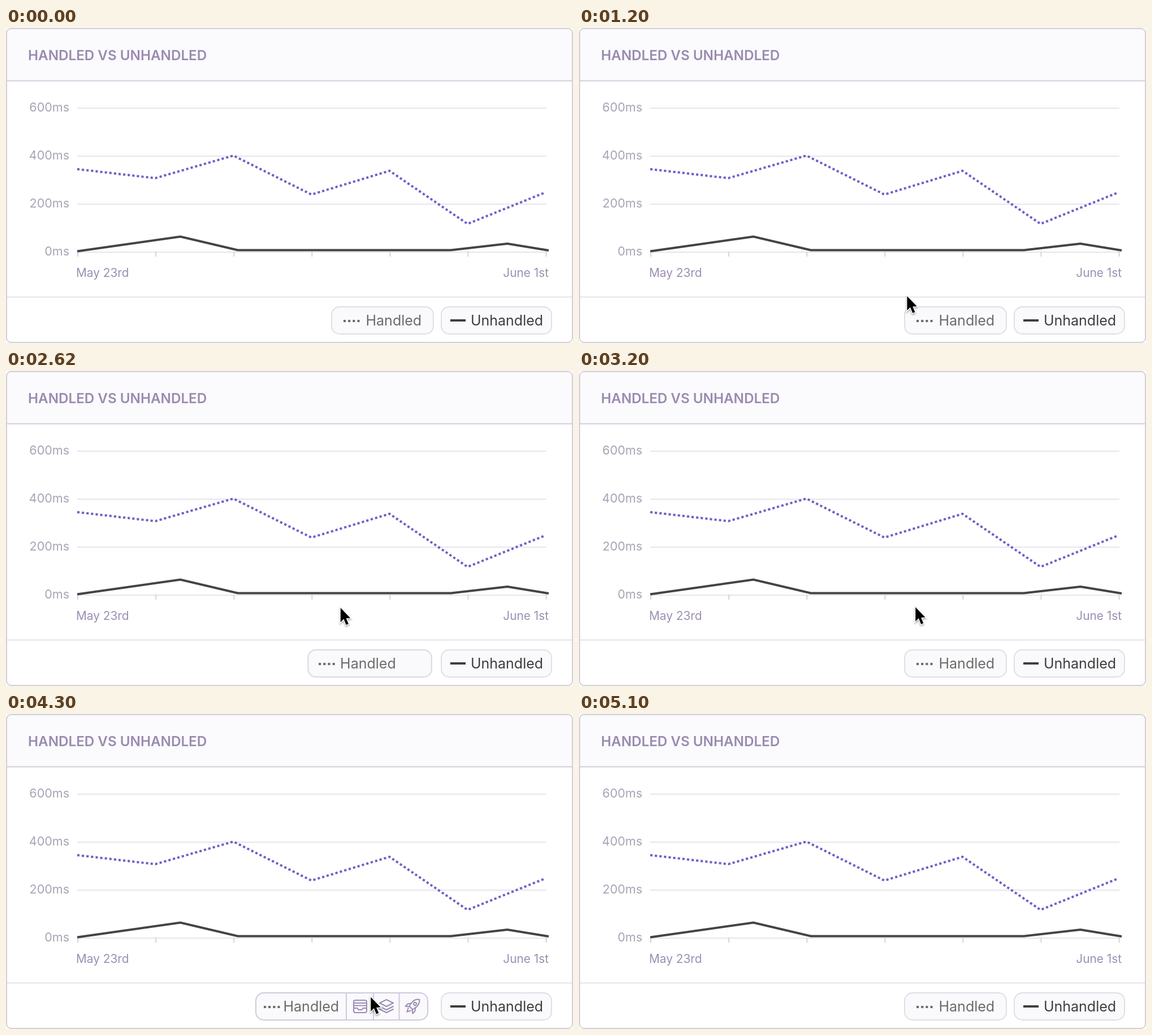
Animation of 1003x558 px, one loop 5980 ms. Source, as an HTML page:

```html
<!DOCTYPE html>
<html lang="en">
<head>
<meta charset="utf-8">
<title>Handled vs unhandled</title>
<style>
  html, body { margin: 0; width: 100%; height: 100%; overflow: hidden; background: #fff; }
  svg { display: block; width: 1003px; height: 558px; font-family: Inter, Roboto, sans-serif; }
  .title { font-size: 24.2px; font-weight: 600; fill: #9a8bb0; }
  .scale { font-size: 21.5px; fill: #aaa3b5; stroke: none; text-anchor: end; }
  .date { font-size: 20.8px; fill: #9c8fb2; }
  .legend { font-size: 25px; }
  .line { fill: none; stroke-width: 4; }
  .dots { stroke-dasharray: 4.08; }
  .chip { fill: #faf9fb; stroke: #e1dee7; stroke-width: 2; }
  .icons { fill: none; stroke: #9c8bb4; stroke-width: 2; stroke-linejoin: round; stroke-linecap: round; }
  .shadow { filter: drop-shadow(0 2px 1.5px rgba(0, 0, 0, .35)); }
</style>
</head>
<body>
<svg viewBox="0 0 1003 558">
  <path d="M1 93V9a8 8 0 0 1 8-8H994a8 8 0 0 1 8 8V93Z" fill="#fbfafc"/>
  <path d="M1 93.5H1002" stroke="#d2cddc" stroke-width="2"/>
  <path d="M1 476.5H1002" stroke="#e6e4ec" stroke-width="2"/>
  <rect x="1" y="1" width="1001" height="556" rx="8" fill="none" stroke="#d3cfdd" stroke-width="2"/>
  <text class="title" x="39" y="57">HANDLED VS UNHANDLED</text>

  <g id="axes" stroke="#e7e5ed" stroke-width="2"></g>
  <text class="date" x="124" y="440.5">May 23rd</text>
  <text class="date" x="960" y="440.5" text-anchor="end">June 1st</text>
  <polyline class="line dots" id="handled" stroke="#6c5fc7"/>
  <path class="line" stroke="#444" d="M126 395.5 308.5 369.5 410 393.5H787L887 382 960 394"/>

  <rect class="chip" x="770" y="494" width="195" height="48" rx="14"/>
  <path class="line" stroke="#3e3e3e" d="M786 518H813"/>
  <text class="legend" x="886" y="527" text-anchor="middle" fill="#3e3e3e">Unhandled</text>

  <rect class="chip" id="chip" y="494" height="48" rx="14"/>
  <path class="line dots" id="sample" stroke="#6b6b6b" d="M0 519H28.5"/>
  <text class="legend" id="label" y="527" fill="#6b6b6b">Handled</text>
  <g class="icons" id="icons">
    <path d="M602 495H650V541H602Z" fill="#faf9fb" stroke="none"/>
    <path d="M602 495V541M650 495V541M695.5 495V541" stroke="#cfc9de" stroke-linecap="butt"/>
    <g transform="translate(626.5 518)">
      <rect x="-11.5" y="-11" width="23" height="22" rx="3"/>
      <path d="M-11-6H11M-11-1.5H11M-11 3H-5L-3 6H3L5 3H11"/>
    </g>
    <g transform="translate(673 518)">
      <path d="M0-12 12-6 0 0-12-6ZM-12 0 0 6 12 0M-12 5 0 11 12 5"/>
    </g>
    <g transform="translate(720 517) rotate(45)">
      <path d="M0-16C6-11 7-3 4 5H-4C-7-3-6-11 0-16ZM-5-1-9 4V10L-4 6M5-1 9 4V10L4 6M-3 9 0 15 3 9"/>
      <circle cy="-5" r="2.5"/>
    </g>
  </g>

  <g id="cursor" class="shadow">
    <path d="M0 0V27L6 21 10.5 32 15 30.2 10.5 19.7 18.5 19.3Z" transform="scale(.94)" stroke="#fff" stroke-width="3" paint-order="stroke"/>
  </g>
</svg>
<script>
const LOOP = 5980, STEP = 20;
const $ = id => document.getElementById(id);
const mix = (a, b, p) => a + (b - a) * p;
const clamp = v => Math.min(1, Math.max(0, v));
const easeIn = p => p ** 2;
const easeOut = p => 1 - (1 - p) ** 2.35;
const easeInOut = p => p < .5 ? 4 * p ** 3 : 1 - 4 * (1 - p) ** 3;

// Chart
const DAY = 138.1;
for (let i = 0; i < 4; i++) {
  const y = 142 + 85 * i;
  $('axes').innerHTML += `<path d="M126 ${y}H956"/><text class="scale" x="112" y="${y + 6.3}">${600 - 200 * i}ms</text>`;
}
for (let day = 0; day < 7; day++) {
  $('axes').innerHTML += `<path stroke="#d6d2df" d="M${127 + DAY * day} 396V405"/>`;
}
$('handled').setAttribute('points',
  [250, 266, 226, 295, 253, 347, 291].map((y, day) => [126 + DAY * day, y]).join(' '));

// The pointer glides between a few resting places
const entry = [859, 39], chart = [633, 314], firstIcon = [631, 512], below = [578, 387],
  secondIcon = [645, 509], rest = [653, 302], exit = [867, 6];
const moves = [
  { start: 310, end: 420, from: entry, to: chart, ease: easeOut },
  { start: 690, end: 1640, from: chart, to: firstIcon, ease: easeOut, bend: [446, 396] },
  { start: 2450, end: 2840, from: firstIcon, to: below, ease: easeOut },
  { start: 3130, end: 3720, from: below, to: secondIcon, ease: easeOut },
  { start: 4210, end: 4640, from: secondIcon, to: rest, ease: easeInOut },
  { start: 4880, end: 5080, from: rest, to: exit, ease: easeIn }
];

function pointer(t) {
  const { start, end, from, to, ease, bend } = moves.findLast(m => t >= m.start) || moves[0];
  const p = ease(clamp((t - start) / (end - start)));
  return from.map((a, k) => {
    const middle = bend ? bend[k] : mix(a, to[k], .5);
    return mix(mix(a, middle, p), mix(middle, to[k], p), p);
  });
}

// The chip opens and closes in turn
const toggles = [1335, 2520, 3500, 4372], TOGGLE_TIME = 310;

function drawChip(t) {
  const last = toggles.findLastIndex(start => t >= start);
  const opening = last % 2 === 0;
  const remaining = last < 0 ? 0 : (1 - clamp((t - toggles[last]) / TOGGLE_TIME)) ** 3;
  const open = opening ? 1 - remaining : remaining;
  const lead = opening ? 1 - remaining ** 1.5 : open;
  const left = mix(575, 441, open);
  const right = mix(757, 747, open) - (opening ? 30 * open * (1 - open) : 0);

  $('chip').setAttribute('x', left + 1);
  $('chip').setAttribute('width', right - left - 2);
  $('chip').style.stroke = `rgb(${mix(225, 207, open)}, ${mix(222, 201, open)}, ${mix(231, 222, open)})`;
  $('sample').setAttribute('transform', `translate(${mix(597, 456, lead)})`);
  $('label').setAttribute('x', mix(636.5, 490.5, lead));
  $('icons').style.opacity = clamp((open - .35) * 4);
}

function draw(t) {
  $('cursor').style.display = t >= 320 && t < 5100 ? '' : 'none';
  $('cursor').setAttribute('transform', `translate(${pointer(t)})`);
  drawChip(t);
}

function frame() {
  draw(Math.floor(performance.now() % LOOP / STEP) * STEP);
  requestAnimationFrame(frame);
}
frame();
</script>
</body>
</html>
```
